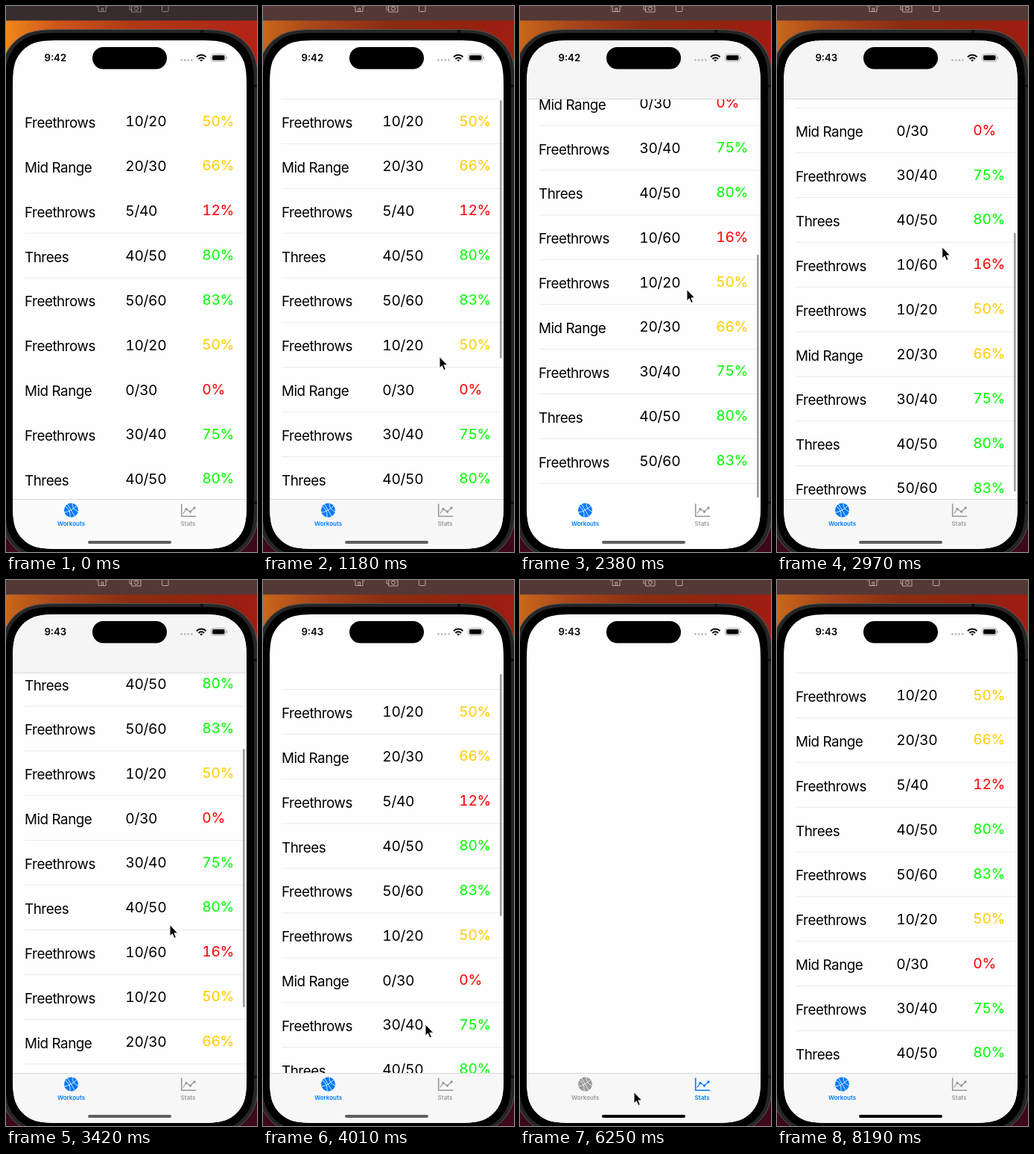
Animation, 337 px wide and 731 px high, one loop 8940 ms. Source, as an HTML page:

```html
<!DOCTYPE html>
<html lang="en">
<head>
<meta charset="utf-8">
<title>Workout list</title>
<style>
  html, body { margin: 0; width: 100%; height: 100%; overflow: hidden; background: #000; }
  svg { display: block; width: 337px; height: 731px; font-family: Inter, Roboto, "Liberation Sans", sans-serif; }
  .label { font-size: 18.8px; letter-spacing: -.45px; }
  .number { font-size: 19.2px; letter-spacing: -.35px; font-variant-numeric: tabular-nums; }
  .tab text { font-size: 8px; font-weight: 600; text-anchor: middle; fill: currentColor; }
  .line { fill: none; stroke: currentColor; stroke-linecap: round; stroke-linejoin: round; }
</style>
</head>
<body>
<svg viewBox="0 0 337 731">
  <defs>
    <linearGradient id="sky">
      <stop offset="0" stop-color="#c9671b"/>
      <stop offset=".2" stop-color="#a8461a"/>
      <stop offset=".5" stop-color="#8a2c12"/>
      <stop offset=".8" stop-color="#94220f"/>
      <stop offset="1" stop-color="#a01d12"/>
    </linearGradient>
    <linearGradient id="skyBright">
      <stop offset="0" stop-color="#ee881a"/>
      <stop offset=".2" stop-color="#cf561c"/>
      <stop offset=".5" stop-color="#ae3a15"/>
      <stop offset="1" stop-color="#b32217"/>
    </linearGradient>
    <linearGradient id="dusk" x2="0" y2="1">
      <stop offset=".1" stop-color="#3d0818" stop-opacity="0"/>
      <stop offset=".6" stop-color="#3d0818"/>
    </linearGradient>
    <clipPath id="screen"><path id="glass"/></clipPath>
  </defs>

  <rect id="backdrop" width="337" height="731"/>
  <rect width="337" height="731" fill="url(#dusk)"/>
  <rect id="toolbar" width="337" height="19.5"/>
  <g id="tools" class="line" stroke-width="1">
    <path d="M121.500 1L129 -5L136.500 1M124 0V7.500H134V0M128 7.500V3H130.500V7.500"/>
    <path d="M166 -1V5H169M169 0H181V8H169Z"/><circle cx="175" cy="3.500" r="2.500"/>
    <rect x="209.500" y="-5" width="8.500" height="12.500" rx="1"/>
  </g>

  <path id="shell" fill="#262626" stroke="#555"/>
  <path id="bezel"/>
  <path d="M263 32V36M333 107H337M333 665H337" stroke="#111" stroke-width="4"/>

  <g clip-path="url(#screen)">
    <rect x="9" y="46" width="314" height="681" fill="#fefefe"/>
    <g id="list"></g>
    <g id="nav">
      <rect x="9" y="46" width="314" height="78" fill="#f5f5f5"/>
      <rect x="9" y="124" width="314" height="1" fill="#dadada"/>
    </g>
    <rect id="thumb" x="318" width="2.600" rx="1.300" fill="#8c8c8c"/>
    <rect id="tabFill" x="9" y="660" width="314" height="67"/>
    <rect id="tabLine" x="9" y="660" width="314" height="1" fill="#d9d9d9"/>
    <g id="workouts" class="tab">
      <circle cx="87.500" cy="675" r="9.500" fill="currentColor"/>
      <path d="M82.500 667L92.500 683.500M78.500 678Q87 677 95 669M79.500 670Q87 674 86 684.500M89 665.500Q88.500 674 97 677" fill="none" stroke="#f8f8f8" stroke-width=".9"/>
      <text x="87.500" y="696">Workouts</text>
    </g>
    <g id="stats" class="tab">
      <path class="line" d="M235.700 667V683.300H254.500" stroke-width="1.600"/>
      <path class="line" d="M238 679L242 673.500L247.500 677L253 672" stroke-width="1.200"/>
      <g fill="currentColor">
        <circle cx="242" cy="673.500" r="1.700"/><circle cx="247.500" cy="677" r="1.700"/><circle cx="253" cy="672" r="1.700"/>
      </g>
      <text x="244.500" y="696">Stats</text>
    </g>
    <rect id="home" x="110" y="716" width="112" height="4" rx="2"/>
  </g>

  <rect x="116" y="55" width="100" height="29.500" rx="14.700"/>
  <text id="clock" x="66.300" y="74.200" font-size="13.200" font-weight="600" text-anchor="middle"></text>
  <path d="M235.500 72.500H250" stroke="#bdbdbd" stroke-width="2.800" stroke-linecap="round" stroke-dasharray="0 4.600"/>
  <g fill="none" stroke="#000" stroke-width="2">
    <path d="M256 68.300A8.500 8.500 0 0 1 268.500 68.300M258.500 71A5 5 0 0 1 266 71"/>
    <path d="M260.200 72.500Q262.200 71 264.300 72.500L262.250 74.600Z" fill="#000" stroke="none"/>
  </g>
  <rect x="275.500" y="64.500" width="19.500" height="9.500" rx="3" fill="none" stroke="#a8a8a8"/>
  <rect x="277" y="66" width="16.500" height="6.500" rx="1.800"/>
  <path d="M296.500 67.500V71" stroke="#a8a8a8"/>

  <path id="cursor" d="M0 -.500V14.800L3.300 11.700L5.800 17.500L8.400 16.400L5.900 10.800H10.800Z" stroke="#fff" stroke-width="1"/>
</svg>

<script>
const LOOP = 8940, TICK = 148.8;
const ROW = 59.87, LIST_TOP = 124, MAX_SCROLL = 363;
const BLUE = '#007aff', GRAY = '#999';
const $ = id => document.getElementById(id);

const names = { F: 'Freethrows', M: 'Mid Range', T: 'Threes' };
const workouts = ('F10/20 M20/30 F5/40 T40/50 F50/60 F10/20 M0/30 F30/40 T40/50 ' +
  'F10/60 F10/20 M20/30 F30/40 T40/50 F50/60').split(' ');

// Keyframes as [tick, value, ...]
const scrollKeys = [[7, 0], [9, 30], [12, 187.3], [14, 315], [16, 383.5], [18, 366], [19.5, 363],
  [21, 315], [23, 195], [25, 60], [26, 0], [27, -22], [29, -8], [31, -.5], [33, 0]];
const cursorKeys = [[2, 320, 459], [3, 285, 459], [5, 237, 459], [7, 237, 470], [9, 240, 560],
  [12, 237, 499], [14, 231, 425], [16, 224, 380], [19.5, 222, 300], [23, 220, 462],
  [26, 218, 590], [31, 218, 617], [33, 226, 645], [36, 250, 686], [40, 250, 686], [41, 215, 686],
  [42, 153, 686], [43, 114, 686], [45, 80, 685], [50, 80, 685], [51, 95, 688], [52, 140, 700],
  [53, 195, 714], [54, 240, 725], [55, 267, 745]];

const clamp = x => Math.max(0, Math.min(1, x));

// Rectangle whose corners ease gradually into the straight sides.
function smoothRect(left, top, right, bottom, r) {
  const corner = (x, y, dx, dy, flip) => {
    const half = [[1.529, 0], [1.088, 0], [.868, 0], [.631, .075], [.373, .169]];
    const points = [...half, ...half.map(([u, v]) => [v, u]).reverse()];
    if (flip) points.reverse();
    const p = points.map(([u, v]) => `${x + dx * u * r} ${y + dy * v * r}`);
    return `${p[0]}C${p.slice(1).join(' ')}`;
  };
  return 'M' + [corner(left, top, 1, 1, true), corner(right, top, -1, 1, false),
    corner(right, bottom, -1, -1, true), corner(left, bottom, 1, -1, false)].join('L') + 'Z';
}

function sample(keys, tick) {
  const next = keys.findIndex(key => key[0] > tick);
  if (next === 0) return keys[0].slice(1);
  if (next < 0) return keys[keys.length - 1].slice(1);
  const a = keys[next - 1], b = keys[next];
  const u = (tick - a[0]) / (b[0] - a[0]);
  return a.slice(1).map((v, i) => v + (b[i + 1] - v) * u);
}

function rowMarkup(entry, i) {
  const score = entry.slice(1);
  const [made, shots] = score.split('/');
  const percent = Math.floor(100 * made / shots);
  const color = percent >= 75 ? '#0f0' : percent >= 50 ? '#fc0' : '#f00';
  const y = ROW * i;
  return `<text class="label" x="25" y="${163 + y}">${names[entry[0]]}</text>
    <text class="number" x="160.300" y="${161.3 + y}">${score}</text>
    <text class="number" x="263.300" y="${160.5 + y}" fill="${color}">${percent}%</text>`;
}

function set(id, attributes) {
  for (const name in attributes) $(id).setAttribute(name, attributes[name]);
}

set('shell', { d: smoothRect(-6.5, 31.5, 338.5, 741.5, 59) });
set('bezel', { d: smoothRect(-1, 36, 333, 737, 54) });
set('glass', { d: smoothRect(9, 46, 323, 727, 46) });
$('list').innerHTML = workouts.map(rowMarkup).join('') +
  Array.from({ length: workouts.length + 1 }, (_, i) =>
    `<rect class="separator" x="25" y="${LIST_TOP + ROW * i}" width="298" height="1" fill="#ebebeb"/>`).join('');
const separators = [...document.querySelectorAll('.separator')];

function render(time) {
  const tick = Math.floor((time % LOOP + 8) / TICK);
  const [scroll] = sample(scrollKeys, tick);
  const [x, y] = sample(cursorKeys, tick);
  const idle = tick < 7;
  const onStats = tick >= 38 && tick < 47;
  const atEnd = scroll >= MAX_SCROLL;

  set('backdrop', { fill: idle ? 'url(#skyBright)' : 'url(#sky)' });
  set('toolbar', { fill: idle ? '#382c2e' : '#533836' });
  set('tools', { color: idle ? '#8d8081' : '#bfa6a3' });
  set('list', { transform: `translate(0 ${-scroll})`, opacity: onStats ? 0 : 1 });
  separators.forEach((line, i) => line.setAttribute('opacity', !idle || i === 3 || i === 4 ? 1 : 0));
  set('nav', { opacity: scroll > .5 ? 1 : 0 });

  // The thumb shrinks while the list is pulled past either end.
  const over = Math.max(0, -scroll, scroll - MAX_SCROLL);
  const inside = Math.max(0, Math.min(MAX_SCROLL, scroll));
  set('thumb', {
    y: 126 + inside * .513 + (atEnd ? over : 0),
    height: 346 - over,
    opacity: idle ? 0 : .85 * clamp((35 - tick) / 3)
  });

  set('tabFill', { fill: atEnd ? '#fefefe' : idle ? '#fbfbfb' : '#f7f7f7' });
  set('tabLine', { opacity: atEnd ? 0 : 1 });
  set('workouts', { color: onStats ? GRAY : BLUE });
  set('stats', { color: onStats ? BLUE : GRAY });
  const shade = Math.round(96 * clamp((35 - tick) / 3));
  set('home', { fill: `rgb(${shade},${shade},${shade})` });
  $('clock').textContent = tick < 19 ? '9:42' : '9:43';
  set('cursor', { transform: `translate(${x} ${y})`, opacity: tick >= 2 && tick < 55 ? 1 : 0 });
}

const start = performance.now();
function loop() {
  render(performance.now() - start);
  requestAnimationFrame(loop);
}
loop();
</script>
</body>
</html>
```
